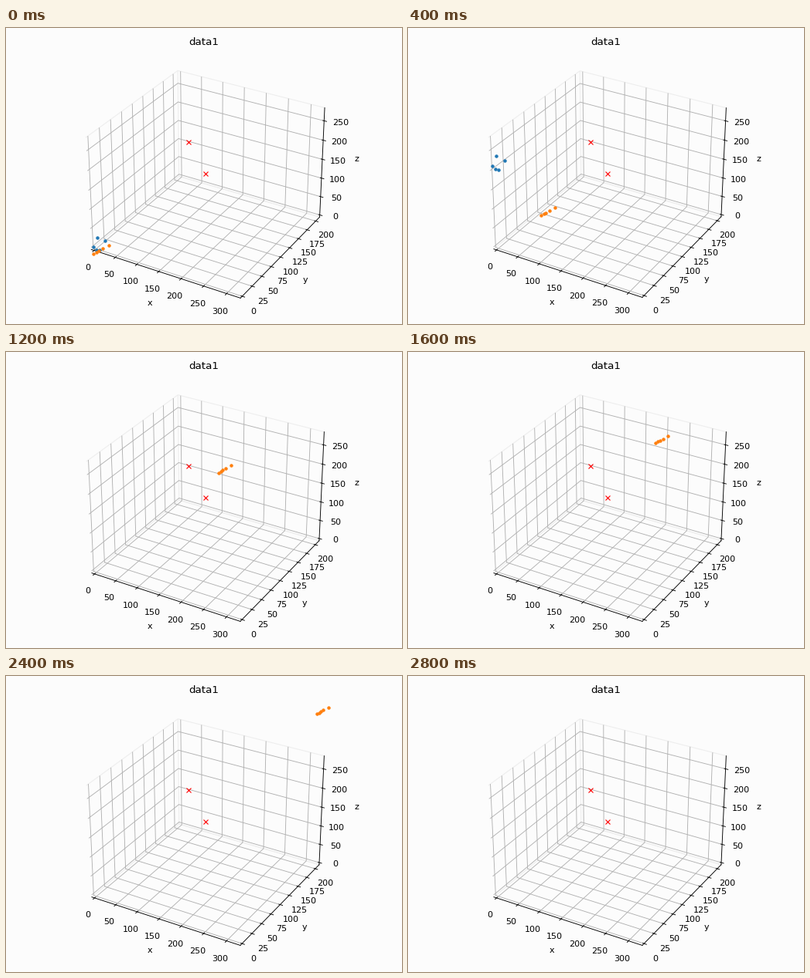
Recreate the animation shown at these times as a matplotlib script. Size 512 px wide and 384 px high, loop 4.4 s.

```python
import numpy as np
import matplotlib.pyplot as plt
from matplotlib.animation import FuncAnimation

W, H, DPI = 512, 384, 80
FRAMES, STEP_MS = 11, 400
BACK, EDGE = "#fcfcfc", "#eeeeee"
RISE, RECEDE = 211, 107.4  # drift per frame along z and along y

# Blue dots sit on a slanted ring, orange dots on a line with widening gaps.
angle = np.radians([28, 104, 210, 246, 270])
ring_x = np.zeros(5)
ring_y = 7.6 + 15.4 * np.cos(angle)
ring_z = 17.5 * np.sin(angle) - 15.1 * np.cos(angle)

along = np.append(0, np.geomspace(0.2, 1, 4))
line_x = -6.8 + 17.6 * along
line_y = 18.5 * along
line_z = -21.7 + 11 * along

fig = plt.figure(figsize=(W / DPI, H / DPI), dpi=DPI, facecolor=BACK)
ax = fig.add_axes([0, 0, 1, 1], projection="3d", facecolor="none")
fig.text(0.5, 1 - 21.7 / H, "data1", fontsize=12, ha="center", va="baseline")


def place_axes(bottom, size):
    ax.set_position([0, bottom / H, 1, size / H])


def padded(top):
    """Limits 0..top with a small margin on both sides."""
    return -top / 48, top * 49 / 48


rising, = ax.plot(ring_x, ring_y, ring_z, ".", color="C0")
receding, = ax.plot(line_x, line_y, line_z, ".", color="C1")
ax.plot([111, 155.5], [112, 106], [210, 147.5], "rx")

ax.set(xlabel="x", ylabel="y", zlabel="z")
ax.set_xticks(np.arange(0, 301, 50))
ax.set_yticks(np.arange(0, 201, 25))
ax.set_zticks(np.arange(0, 251, 50))
ax.set_xlim(*padded(323))
ax.set_ylim(*padded(207.5))
ax.set_zlim(*padded(277.5))

for axis in (ax.xaxis, ax.yaxis, ax.zaxis):
    axis.pane.set_fill(False)
    axis.pane.set_alpha(1)
    axis.pane.set_edgecolor(EDGE)


def update(i):
    # The layout settles slightly smaller after the first frame.
    if i == 0:
        place_axes(12, 343.3)
    else:
        place_axes(13, 341.8)
    rising.set_data_3d(ring_x, ring_y, ring_z + i * RISE)
    receding.set_data_3d(line_x, line_y + i * RECEDE, line_z)
    return rising, receding


anim = FuncAnimation(fig, update, frames=FRAMES, interval=STEP_MS, repeat=True)
plt.show()
```
